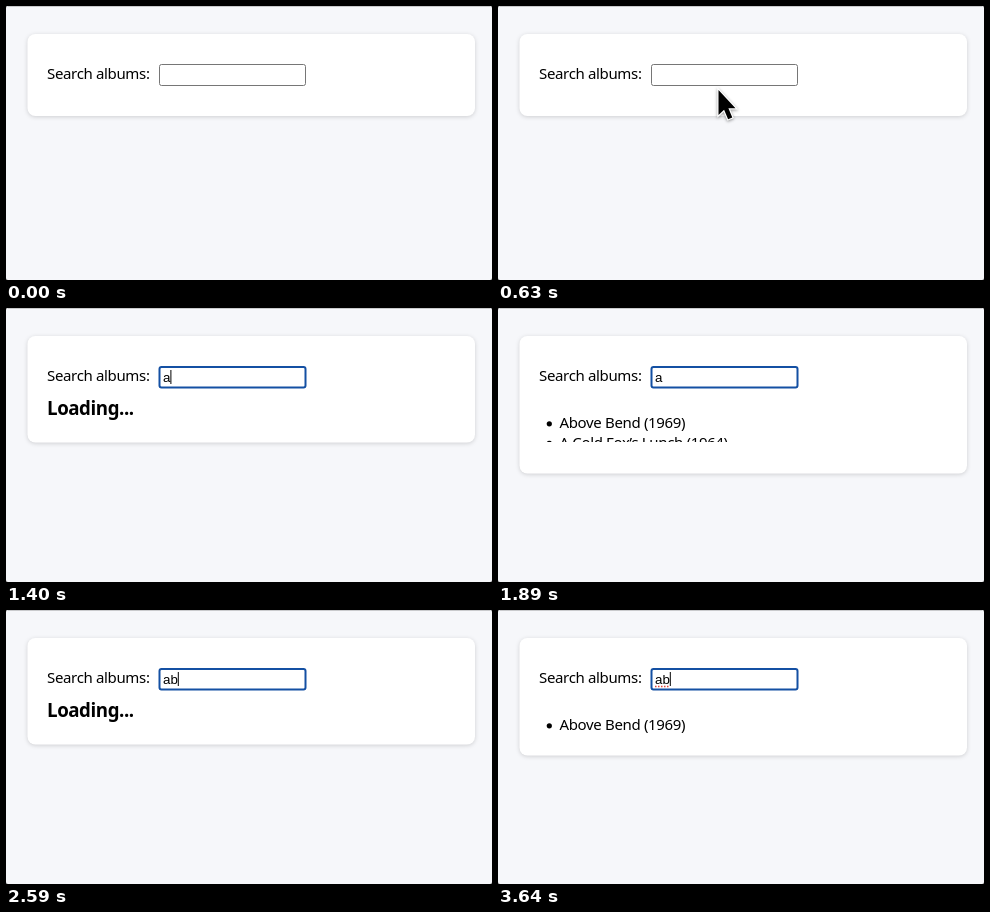
These frames come from a looping animation (486 px wide and 274 px high, 3710 ms). An HTML page:

```html
<!DOCTYPE html>
<html lang="en">
<head>
<meta charset="utf-8">
<title>Album search</title>
<style>
html, body { margin: 0; width: 100%; height: 100%; overflow: hidden; background: #555; }
svg { display: block; width: 486px; height: 274px; }
text { font: 15px "Noto Sans", "Open Sans", sans-serif; letter-spacing: -.023em; }
#loading { font-size: 18.7px; font-weight: 600; }
#query { font: 13.333px "Liberation Sans", Arial, sans-serif; letter-spacing: 0; }
#card { fill: #fff; filter: drop-shadow(0 1.5px 2px rgba(0, 0, 0, .16)); }
#arrow { filter: drop-shadow(0 1px 1.5px rgba(0, 0, 0, .4)); }
</style>
</head>
<body>
<svg viewBox="0 0 486 274">
  <defs><clipPath id="clip"><rect id="clipBox" width="486" height="274"/></clipPath></defs>
  <rect width="486" height="274" rx="2" fill="#f6f7fa"/>
  <path d="M2 .5H484" stroke="#c9cacc"/>
  <rect id="card" x="21.5" y="28" width="447.5" rx="8"/>
  <text x="41" y="73">Search albums:</text>
  <rect id="box" fill="#fff"/>
  <text id="query" x="157" y="74"></text>
  <path id="caret" d="M0 62V76" stroke="#000"/>
  <path id="spelling" d="M157 76.5H172" stroke="#e0453c" stroke-width="1.4" stroke-dasharray="1.5 1.5"/>
  <text id="loading" x="41" y="107">Loading...</text>
  <g clip-path="url(#clip)">
    <g id="first"><circle cx="51.3" cy="115.8" r="2.6"/><text x="61.5" y="120">Above Bend (1969)</text></g>
    <g id="second"><circle cx="51.3" cy="135.3" r="2.6"/><text x="61.5" y="139.5">A Cold Fox’s Lunch (1964)</text></g>
  </g>
  <path id="arrow" d="M0 0V25L5.6 19.8 9.6 29.2 13.8 27.4 9.9 18.2H17Z" stroke="#fff" stroke-width="2.4" paint-order="stroke"/>
  <path id="beam" d="M-5-17Q0-17 0-13Q0-17 5-17M0-13V13M-5 17Q0 17 0 13Q0 17 5 17" fill="none" stroke="#222" stroke-width="2"/>
</svg>
<script>
const LOOP = 3710, STEP = 70;
const el = id => document.getElementById(id);
const show = (id, on) => el(id).setAttribute("visibility", on ? "visible" : "hidden");
const set = (id, attrs) => { for (const k in attrs) el(id).setAttribute(k, attrs[k]); };
const clamp = v => Math.max(0, Math.min(1, v));
const ease = v => 1 - (1 - v) ** 2;
const within = (t, ...spans) => spans.some(([a, b]) => t >= a && t < b);
// Latest value whose start time has passed
const at = (t, keys) => keys.filter(k => k[0] <= t).pop()[1];

function pointer(t) {
  if (t < 910) {
    const u = ease(clamp((t - 70) / 420)), v = 1 - u;
    return [v * v * 236 + 2 * u * v * 200 + u * u * 220.5, 227 - 143 * u];
  }
  const u = clamp((t - 840) / 210);
  return [220.5 + 4 * u, 84 - 24 * u];
}

function draw(t) {
  const focused = t >= 1120;
  const query = at(t, [[0, ""], [1330, "a"], [2450, "ab"]]);
  const bottom = at(t, [[0, 110], [1400, 134.5], [1890, 165.5], [2590, 134.5], [3150, 145.5]]);

  set("card", { height: bottom - 28 });
  set("box", focused
    ? { x: 153.5, y: 59, width: 146, height: 20.5, rx: 2, stroke: "#1450a3", "stroke-width": 2 }
    : { x: 153.5, y: 58.5, width: 146, height: 21, rx: 2, stroke: "#767676", "stroke-width": 1 });
  el("query").textContent = query;

  const caretX = 157.5 + 7.4 * query.length;
  set("caret", { transform: `translate(${caretX})` });
  show("caret", within(t, [1120, 1890], [2450, 2940], [3570, LOOP]));
  show("spelling", t >= 3640);

  show("loading", within(t, [1400, 1890], [2520, 2940]));
  show("first", within(t, [1890, 2520], [2940, LOOP]));
  show("second", within(t, [1890, 2520]));
  set("clipBox", { height: within(t, [1890, 1960]) ? 134 : 274 });

  const move = `translate(${pointer(t)})`;
  set("arrow", { transform: move });
  set("beam", { transform: move });
  show("arrow", within(t, [70, 1050]));
  show("beam", within(t, [1050, 1190]));
}

function tick() {
  const t = performance.now() % LOOP;
  draw(Math.floor(t / STEP) * STEP);
  requestAnimationFrame(tick);
}
tick();
</script>
</body>
</html>
```
